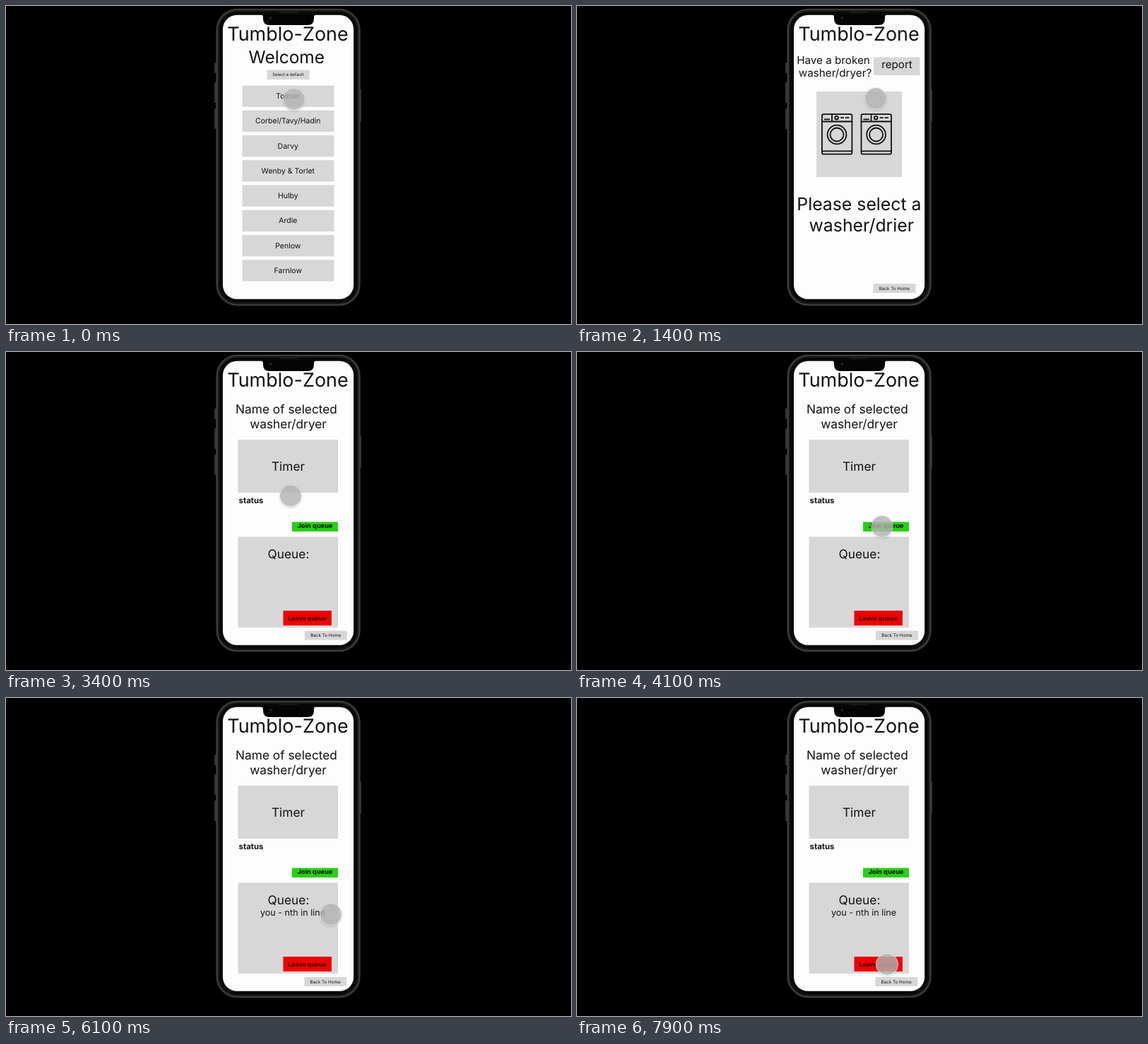
Recreate the animation shown at these times as an HTML page. Size 800x450 px, loop 8000 ms.

```html
<!DOCTYPE html>
<html lang="en">
<head>
<meta charset="utf-8">
<title>Laundry app prototype</title>
<style>
html, body { margin: 0; width: 100%; height: 100%; overflow: hidden; background: #000; }
#stage { position: relative; width: 800px; height: 450px; overflow: hidden; }
svg { position: absolute; inset: 0; font-family: Inter, sans-serif; fill: #111; }
text { text-anchor: middle; text-rendering: geometricPrecision; }
.bold { font-weight: 700; }
.box { fill: #d8d7d8; }
.icon { fill: none; stroke: #111; stroke-width: 1.8; stroke-linecap: round; }

/* screens: hard cuts */
.home, .machines, .detail, .before, .joined { visibility: hidden; animation: 8s step-end infinite; }
.home { animation-name: home; }
.machines { animation-name: machines; }
.detail { animation-name: detail; }
.before { animation-name: before; }
.joined { animation-name: joined; }
@keyframes home { 0% { visibility: visible } 17.5%, 100% { visibility: hidden } }
@keyframes machines { 0% { visibility: hidden } 17.5% { visibility: visible } 40%, 100% { visibility: hidden } }
@keyframes detail { 0% { visibility: hidden } 40%, 100% { visibility: visible } }
@keyframes before { 0% { visibility: hidden } 40% { visibility: visible } 61.25%, 100% { visibility: hidden } }
@keyframes joined { 0% { visibility: hidden } 61.25%, 100% { visibility: visible } }

/* touch point: x and y move separately, so sine easing gives the orbit */
.x, .y { position: absolute; left: 0; top: 0; animation: 8s cubic-bezier(.37, 0, .63, 1) infinite; }
.x { animation-name: x; }
.y { animation-name: y; }
.dot {
  position: absolute; left: -16px; top: -16px; width: 32px; height: 32px; box-sizing: border-box;
  border: 1.5px solid rgba(225, 225, 225, .55); border-radius: 50%;
  background: rgba(178, 178, 178, .82); background-clip: padding-box;
  box-shadow: 0 1px 3px rgba(0, 0, 0, .16);
  animation: press 8s step-end infinite;
}
@keyframes x {
  0% { transform: translateX(407.7px) }
  3.75% { transform: translateX(401px) }
  11.25%, 20% { transform: translateX(423px) }
  28.75%, 38.125% { transform: translateX(373px) }
  48.1% { transform: translateX(447px) }
  51.25%, 65.6% { transform: translateX(432px) }
  68.41% { transform: translateX(461px) }
  72.22% { transform: translateX(337px) }
  76.04% { transform: translateX(461px) }
  79.85% { transform: translateX(337px) }
  83.66%, 85.6% { transform: translateX(459px) }
  95% { transform: translateX(435px) }
  96.25%, 100% { transform: translateX(439px) }
}
@keyframes y {
  0% { transform: translateY(132px) }
  6.25% { transform: translateY(180px) }
  11.25%, 20% { transform: translateY(131px) }
  26.25% { transform: translateY(186px) }
  28.75%, 38.125% { transform: translateY(180px) }
  48.1% { transform: translateY(238px) }
  51.25% { transform: translateY(247px) }
  61.25%, 65.6% { transform: translateY(249px) }
  70.32% { transform: translateY(337px) }
  74.12% { transform: translateY(261px) }
  77.94% { transform: translateY(337px) }
  81.75% { transform: translateY(261px) }
  83.66%, 85.6% { transform: translateY(290px) }
  93.75% { transform: translateY(383px) }
  96.25%, 100% { transform: translateY(377px) }
}
@keyframes press {
  0%, 17.5%, 40%, 61.5% { background-color: rgba(178, 178, 178, .82); border-color: rgba(225, 225, 225, .55) }
  15%, 58.75%, 97.5% { background-color: rgba(178, 178, 178, .82); border-color: rgba(240, 240, 240, .85) }
  37.5% { background-color: rgba(168, 168, 168, .6); border-color: rgba(205, 205, 205, .7) }
}
</style>
</head>
<body>
<div id="stage">
<svg width="800" height="450" viewBox="0 0 800 450">
  <g fill="#343434">
    <rect x="295" y="80" width="4" height="15" rx="1"/>
    <rect x="295" y="108" width="4" height="29" rx="1"/>
    <rect x="295" y="145" width="4" height="29" rx="1"/>
    <rect x="500" y="118" width="3" height="46" rx="1"/>
  </g>
  <rect x="298.7" y="5" width="201.8" height="418" rx="29" fill="#080808" stroke="#3b3b3b" stroke-width="2.6"/>
  <rect x="301" y="7.3" width="197.2" height="413.4" rx="27" fill="none" stroke="#1c1c1c" stroke-width="1.5"/>
  <rect x="307" y="12.8" width="185.2" height="402" rx="20" fill="#fdfdfd"/>
  <path d="M361 12H439Q436 12.500 436 16V18Q436 27 427 27H373Q364 27 364 18V16Q364 12.500 361 12Z" fill="#040404"/>
  <rect x="386" y="8" width="27" height="2" rx="1" fill="#181818"/>
  <circle cx="375" cy="17" r="2.6" fill="#10131c"/>
  <circle cx="375" cy="17" r="1" fill="#1c2744"/>
  <text x="399" y="49" font-size="27">Tumblo-Zone</text>

  <g class="home" id="home">
    <text x="397.300" y="81" font-size="24.500">Welcome</text>
    <rect class="box" x="369.500" y="90.500" width="60" height="13.500"/>
    <text x="399.300" y="99.400" font-size="6">Select a default</text>
  </g>

  <g class="machines">
    <g font-size="15.200">
      <text x="363" y="82">Have a broken</text>
      <text x="365.500" y="100.300">washer/dryer?</text>
      <rect class="box" x="420" y="72.500" width="65.500" height="25.500"/>
      <text x="453" y="88">report</text>
    </g>
    <rect class="box" x="339" y="121" width="121" height="121"/>
    <g class="icon" id="washer">
      <rect x="346.900" y="153.200" width="42.500" height="56.400" rx="2.200"/>
      <path d="M347 163.500H389.400M347 205.300H389.400M361 153.200V163.500M350.500 160.300H357.500M374 158.200H377.300M380.800 158.200H384.500"/>
      <circle cx="367.600" cy="158.200" r="2.300"/>
      <circle cx="368" cy="182" r="13.400"/>
      <circle cx="368" cy="182" r="9.500"/>
    </g>
    <use href="#washer" x="55.600"/>
    <g font-size="24.800">
      <text x="399.400" y="288.700">Please select a</text>
      <text x="402.800" y="318.800">washer/drier</text>
    </g>
    <rect class="box" x="419.500" y="393" width="60" height="13"/>
    <text x="449.300" y="401.800" font-size="6.300">Back To Home</text>
  </g>

  <g class="detail">
    <rect class="box" x="328.500" y="124" width="141.500" height="75"/>
    <rect class="box" x="328.500" y="261.500" width="141.500" height="128.500"/>
    <g font-size="17.300">
      <text x="397" y="87">Name of selected</text>
      <text x="399.500" y="107.500">washer/dryer</text>
      <text x="399.500" y="168.300">Timer</text>
      <text x="400" y="292">Queue:</text>
    </g>
    <text class="bold" x="347" y="213.700" font-size="11.400">status</text>
    <rect x="405" y="240.500" width="65" height="13.500" fill="#28d014"/>
    <text class="bold" x="437.500" y="249.400" font-size="9.300">Join queue</text>
    <rect x="392.500" y="366" width="68.500" height="21" fill="#ec0303"/>
    <text class="bold" x="426.500" y="379.500" font-size="8.800" fill="#3a0505">Leave queue</text>
  </g>
  <g class="before">
    <rect class="box" x="423" y="394.500" width="60" height="13"/>
    <text x="452.800" y="403.200" font-size="6.300">Back To Home</text>
  </g>
  <g class="joined">
    <text x="406" y="307.800" font-size="12.600">you - nth in line</text>
    <rect class="box" x="422.300" y="395" width="60" height="13"/>
    <text x="452.100" y="403.600" font-size="6.300">Back To Home</text>
  </g>
</svg>
<div class="x"><div class="y"><div class="dot"></div></div></div>
</div>
<script>
const halls = ["Tolmer", "Corbel/Tavy/Hadin", "Darvy", "Wenby & Torlet", "Hulby", "Ardle", "Penlow", "Farnlow"];
const home = document.getElementById("home");

function add(tag, attrs, label = "") {
  const el = document.createElementNS("http://www.w3.org/2000/svg", tag);
  for (const key in attrs) el.setAttribute(key, attrs[key]);
  el.textContent = label;
  home.append(el);
}

halls.forEach((hall, i) => {
  const y = 112.5 + i * 35.25;
  add("rect", { class: "box", x: 334.5, y, width: 130, height: 30.3 });
  add("text", { x: 399.3, y: y + 18.7, "font-size": 10.5 }, hall);
});
</script>
</body>
</html>
```
